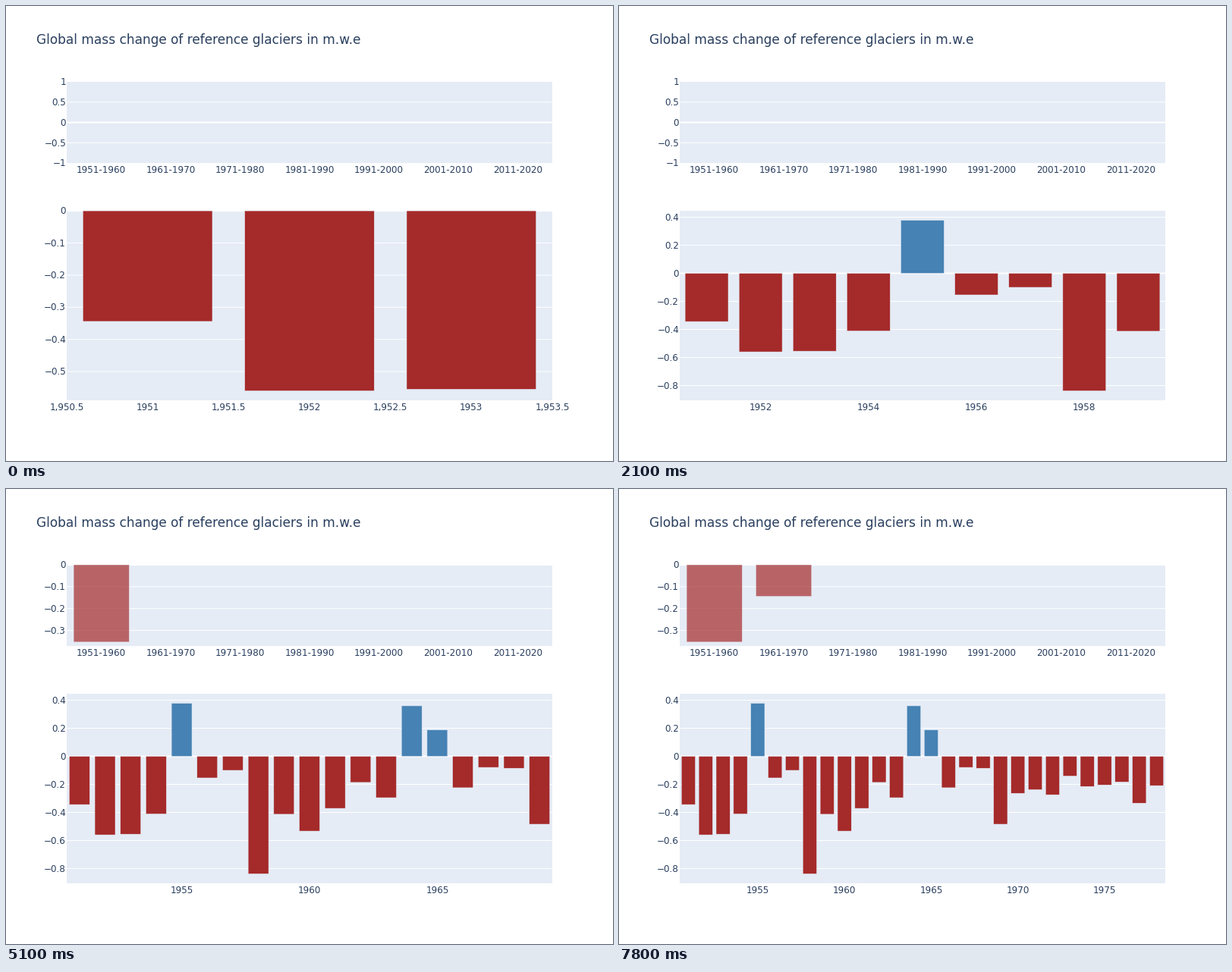
Write a matplotlib script that moves like this. It is 800 px wide and 600 px high and loops after 8000 ms.

```python
import math

import matplotlib.pyplot as plt
from matplotlib.animation import FuncAnimation
from matplotlib.patches import Rectangle

W, H, DPI = 800, 600, 100
LEFT, RIGHT = 80, 720
TOP_PANEL = (100, 207.1)
YEAR_PANEL = (270.1, 520)
FRAME_MS, YEAR_MS, LOOP_MS = 100, 300, 8000

PANEL, INK = "#e5ecf6", "#2a3f5f"
LOSS, GAIN = "#a52a2a", "#4682b4"
FIRST_YEAR = 1951
CHANGES = [
    -0.344, -0.560, -0.555, -0.411, 0.378, -0.154, -0.100, -0.838, -0.413, -0.533,
    -0.371, -0.186, -0.295, 0.360, 0.188, -0.224, -0.079, -0.085, -0.484, -0.264,
    -0.238, -0.274, -0.141, -0.215, -0.204, -0.183, -0.334, -0.209,
]
DECADES = [f"{y}-{y + 9}" for y in range(FIRST_YEAR, 2021, 10)]

plt.rcParams["font.family"] = "DejaVu Sans"
fig = plt.figure(figsize=(W / DPI, H / DPI), dpi=DPI, facecolor="white")
ax = fig.add_axes([0, 0, 1, 1])


def text(x, baseline, label, size=12, align="center"):
    ax.text(x, baseline, label, size=size * 72 / DPI, color=INK, ha=align, va="baseline")


def box(x0, y0, x1, y1, color, **style):
    style = {"linewidth": 0, **style}
    ax.add_patch(Rectangle((x0, y0), x1 - x0, y1 - y0, facecolor=color, snap=False, **style))


def tick_step(span, length, spacing):
    """Next step of 1, 2 or 5 times a power of ten above the wanted density."""
    rough = span / (min(max(length / spacing, 4), 9) + 1)
    base = 10 ** math.floor(math.log10(rough))
    return base * next((m for m in (2, 5) if m > rough / base + 1e-9), 10)


def ticks(lo, hi, step):
    first, last = math.ceil(lo / step - 1e-6), math.floor(hi / step + 1e-6)
    return [round(k * step, 6) for k in range(first, last + 1)]


def value_range(values):
    """Data range with 5 % padding on each side that leaves zero."""
    if not values:
        return -1, 1
    lo, hi = min(0, *values, 0), max(0, *values, 0)
    pad = (hi - lo) * 0.05 / (1 - 0.05 * ((lo < 0) + (hi > 0)))
    return lo - pad * (lo < 0), hi + pad * (hi > 0)


def panel(top, bottom, values, slots, alpha):
    lo, hi = value_range(values)

    def to_y(v):
        return top + (hi - v) / (hi - lo) * (bottom - top)

    box(LEFT, top, RIGHT, bottom, PANEL)
    for v in ticks(lo, hi, tick_step(hi - lo, bottom - top, 40)):
        y = to_y(v)
        if v == 0:
            box(LEFT, y - 1, RIGHT, y + 1, "white")
        elif top + 1 < y < bottom - 1:
            box(LEFT, y - 0.5, RIGHT, y + 0.5, "white")
        text(79, y + 4.2, f"{v:g}".replace("-", "\u2212"), align="right")

    slot = (RIGHT - LEFT) / slots
    for i, v in enumerate(values):
        x = LEFT + i * slot
        y0, y1 = sorted((to_y(0), to_y(v)))
        box(x + 0.1 * slot, y0, x + 0.9 * slot, y1, LOSS if v < 0 else GAIN,
            edgecolor=PANEL, linewidth=0.5 * 72 / DPI, alpha=alpha)


def draw(frame):
    count = max(3, 2 + frame * FRAME_MS // YEAR_MS)
    shown = CHANGES[:count]
    means = [sum(shown[k:k + 10]) / 10 for k in range(0, count - 9, 10)]

    ax.cla()
    ax.set(xlim=(0, W), ylim=(H, 0))
    ax.axis("off")
    text(40, 50, "Global mass change of reference glaciers in m.w.e", 17, "left")

    panel(*TOP_PANEL, means, len(DECADES), 0.7)
    for i, label in enumerate(DECADES):
        text(LEFT + (i + 0.5) * (RIGHT - LEFT) / len(DECADES), 220, label)

    panel(*YEAR_PANEL, shown, count, 1)
    start = FIRST_YEAR - 0.5
    for year in ticks(start, start + count, tick_step(count, RIGHT - LEFT, 80)):
        label = f"{year:.0f}" if year == int(year) else f"{year:,.1f}"
        text(LEFT + (year - start) / count * (RIGHT - LEFT), 533, label)
    return []


anim = FuncAnimation(fig, draw, frames=LOOP_MS // FRAME_MS, interval=FRAME_MS,
                     init_func=lambda: draw(0), repeat=True, repeat_delay=0)
plt.show()
```
